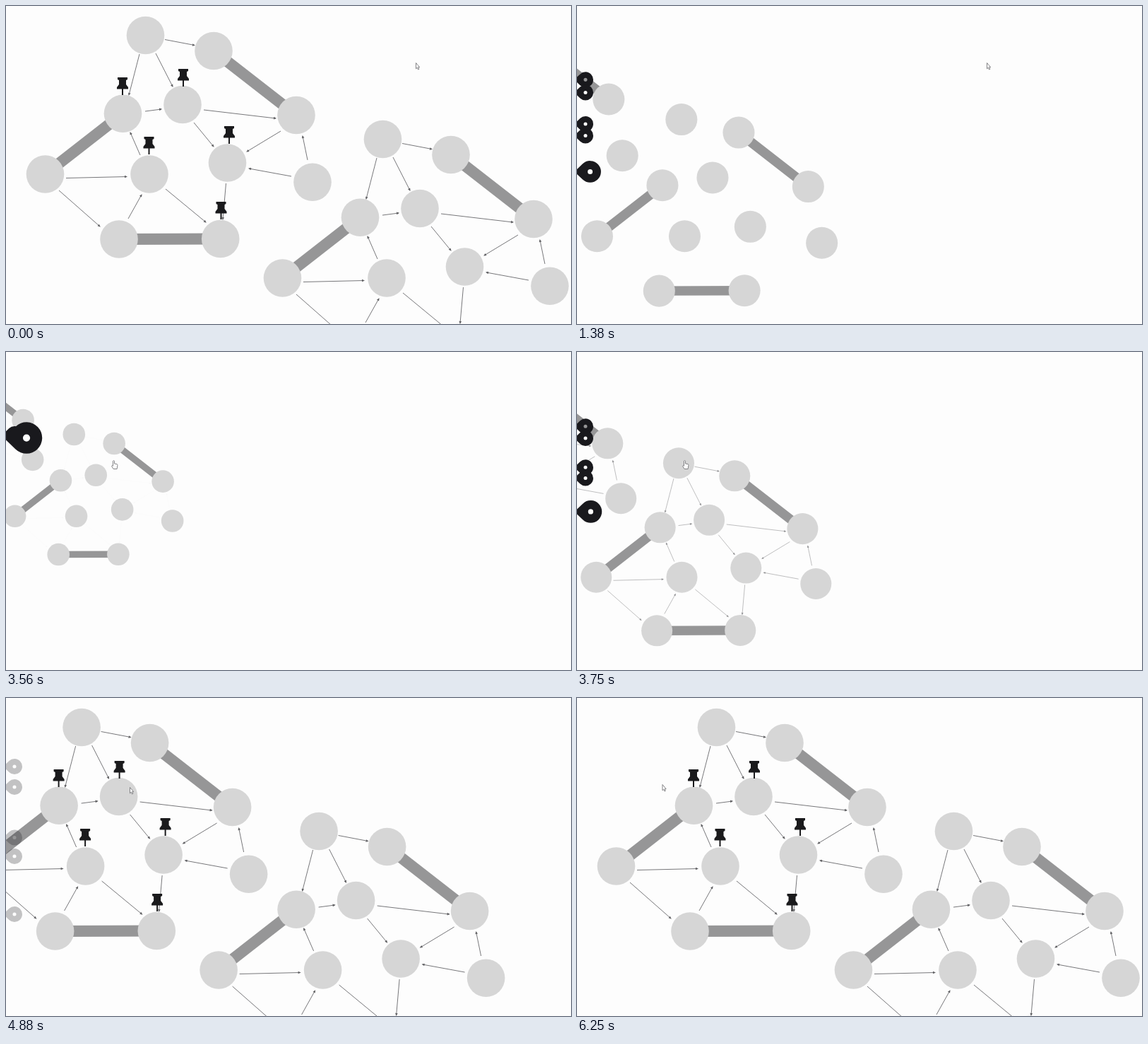
Write an HTML page with a canvas that moves like this. It is 800 by 450 pixels and loops after 6440 ms.

```html
<!DOCTYPE html>
<html lang="en">
<head>
<meta charset="utf-8">
<title>Graph with pinned nodes</title>
<style>
html, body { margin: 0; width: 100%; height: 100%; overflow: hidden; background: #fdfdfd; }
canvas { display: block; width: 800px; height: 450px; }
</style>
</head>
<body>
<canvas id="stage" width="800" height="450"></canvas>
<script>
const ctx = document.getElementById('stage').getContext('2d');
const LOOP = 6440, STEP = 62.5, TAU = Math.PI * 2;
const PAN = -353, ZOOM = 0.578, FOCUS = [-24.5, 13.3];
const COPY = [336, 147];

const nodes = [
  [197.5, 41.5], [294, 63.5], [165.5, 152.3], [250, 139.5], [411, 154.5], [55.5, 238],
  [203, 238], [313.5, 222], [434, 249.3], [160, 330], [303.7, 329.5]
];
const bars = [[1, 4], [2, 5], [9, 10]];
const arrows = [
  [225, 47.5, 267, 55.5], [189, 68, 174, 126], [212, 67, 236, 114],
  [197, 149, 220, 146], [280, 147, 382, 159], [266, 165, 294, 199],
  [389, 177, 341, 206], [427, 218, 420, 184], [404, 241, 344, 230],
  [85, 243.5, 171, 241.5], [75, 261, 133, 312], [190, 211, 176, 179],
  [173, 301, 192, 267], [226, 259, 283, 306], [311.5, 251, 307, 302]
];
const pins = [[165, 126], [251, 114], [316, 195], [202.5, 210], [304.5, 302]];
const markers = [97, 126, 197.5, 224, 306];

const pinShape = new Path2D(
  'M-7-25H7V-22L5-21V-15L8-11V-8.5H1V0H-1V-8.5H-8V-11L-5-15V-21L-7-22Z');
const arrowShape = new Path2D('M.5.5V8.8L2.2 7.2L3.5 10L4.8 9.4L3.6 6.7H5.7Z');
const handShape = new Path2D(
  'M-1 7V1.2Q0-.2 1 1.2V5L4.6 5.7Q5.6 6 5.4 7.4L4.6 12.5H-.4L-3 8.4Q-2.6 6.9-1 8.2Z');

const lerp = (a, b, k) => a + (b - a) * k;
const span = (t, start, length) => Math.min(1, Math.max(0, (t - start) / length));
const outCubic = k => 1 - (1 - k) ** 3;
const outSine = k => Math.sin(k * Math.PI / 2);
const smooth = k => k * k * (3 - 2 * k);

function line(x1, y1, x2, y2) {
  ctx.beginPath();
  ctx.moveTo(x1, y1);
  ctx.lineTo(x2, y2);
  ctx.stroke();
}

function disc(x, y, r) {
  ctx.beginPath();
  ctx.arc(x, y, r, 0, TAU);
  ctx.fill();
}

function arrow([x1, y1, x2, y2]) {
  const a = Math.atan2(y2 - y1, x2 - x1);
  line(x1, y1, x2, y2);
  ctx.save();
  ctx.translate(x2, y2);
  ctx.rotate(a);
  ctx.beginPath();
  ctx.moveTo(1, 0);
  ctx.lineTo(-3, -1.8);
  ctx.lineTo(-3, 1.8);
  ctx.fill();
  ctx.restore();
}

function graph(arrowAlpha) {
  ctx.strokeStyle = '#969697';
  ctx.lineWidth = 16;
  for (const [a, b] of bars) line(...nodes[a], ...nodes[b]);
  ctx.fillStyle = '#d6d6d6';
  for (const [x, y] of nodes) disc(x, y, 26.8);
  ctx.globalAlpha = arrowAlpha;
  ctx.strokeStyle = '#77777a';
  ctx.fillStyle = '#626265';
  ctx.lineWidth = 1;
  arrows.forEach(arrow);
  ctx.globalAlpha = 1;
}

// Drop pointing left, with a see-through hole.
function marker(x, y, r) {
  const a = Math.acos(1 / 1.45);
  ctx.beginPath();
  ctx.arc(x, y, r, Math.PI + a, Math.PI - a + TAU);
  ctx.lineTo(x - 1.45 * r, y);
  ctx.closePath();
  ctx.moveTo(x + r * 0.23, y);
  ctx.arc(x, y, r * 0.23, 0, TAU);
  ctx.fill('evenodd');
}

function cursor(t) {
  const a = smooth(span(t, 2250, 625));
  const b = smooth(span(t, 4187.5, 187.5));
  const c = smooth(span(t, 5562.5, 375));
  const x = lerp(580, 152.5, a) + 22.5 * b - 54.5 * c;
  const y = lerp(80, 153, a) - 27 * b - 4 * c;
  const hand = x < 252 && t < 4740;
  ctx.save();
  ctx.translate(x, y);
  ctx.fillStyle = '#fff';
  ctx.strokeStyle = '#77777a';
  ctx.lineWidth = 0.9;
  const shape = hand ? handShape : arrowShape;
  ctx.fill(shape);
  ctx.stroke(shape);
  ctx.restore();
}

function draw(t) {
  const pan = outCubic(span(t, 18, 400)) - outCubic(span(t, 4729, 400));
  const zoom = outSine(span(t, 1237, 560)) - outSine(span(t, 3554, 500));
  const scale = lerp(1, ZOOM, zoom);
  const arrowAlpha = t > 3000 ? 1 - zoom : +(zoom === 0);

  ctx.fillStyle = '#fdfdfd';
  ctx.fillRect(0, 0, 800, 450);

  ctx.save();
  ctx.translate((1 - scale) * FOCUS[0], (1 - scale) * FOCUS[1]);
  ctx.scale(scale, scale);
  ctx.translate(PAN * pan, 0);
  graph(arrowAlpha);
  ctx.fillStyle = '#1a1a1c';
  for (const [x, y] of pins) {
    ctx.save();
    ctx.translate(x, y);
    ctx.fill(pinShape);
    ctx.restore();
  }
  ctx.translate(...COPY);
  graph(arrowAlpha);
  ctx.restore();

  // Off-screen markers gather into one large marker as the view zooms out.
  ctx.globalAlpha = pan;
  ctx.fillStyle = '#19191d';
  markers.forEach((y, i) => {
    const grow = i === markers.length - 1 ? zoom : 0;
    marker(lerp(12, 29.5, grow), lerp(y, 116.5, zoom), lerp(11, 22.5, grow));
  });
  ctx.globalAlpha = 1;
  cursor(t);
}

const begin = performance.now();
function tick() {
  const t = (performance.now() - begin) % LOOP;
  draw(Math.floor((t + 3) / STEP) * STEP);
  requestAnimationFrame(tick);
}
tick();
</script>
</body>
</html>
```
